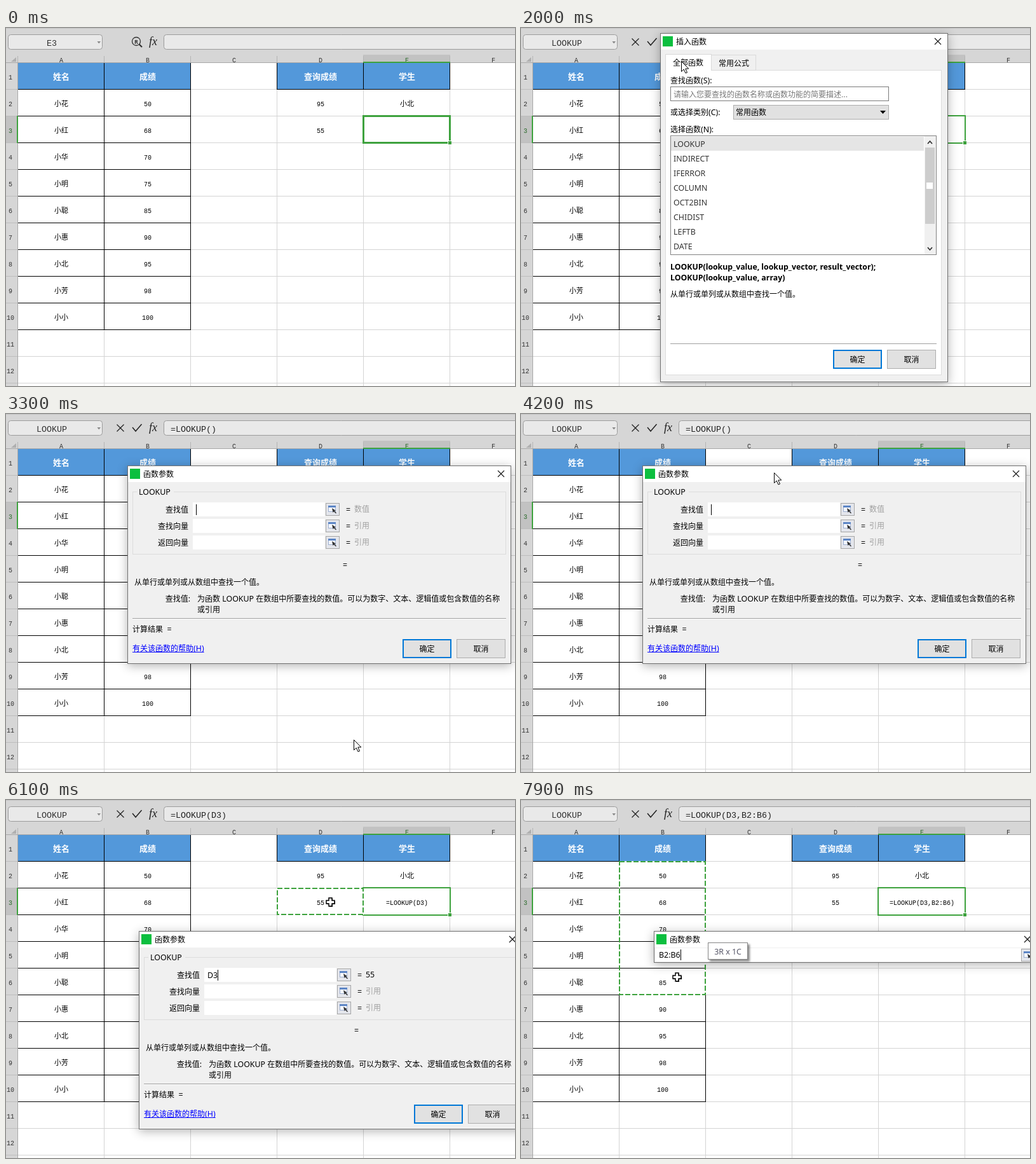
An HTML page with a canvas that plays this animation: 801x563 px, repeating every 8000 ms.

```html
<!DOCTYPE html>
<html lang="zh-CN">
<head>
<meta charset="utf-8">
<title>LOOKUP</title>
<style>
html, body { margin: 0; width: 100%; height: 100%; overflow: hidden; background: #fff; }
canvas { display: block; }
</style>
</head>
<body>
<canvas id="stage" width="801" height="563"></canvas>
<script>
const g = document.getElementById('stage').getContext('2d');
const W = 801, H = 563, LOOP = 8000, STEP = 100;
const GREEN = '#3ea23e', BLUE = '#5398da', GRAY = '#d6d6d6', FACE = '#f0f0f0', ACCENT = '#0078d7';
const CJK = '"Noto Sans CJK SC", "Noto Sans CJK", sans-serif';
const MONO = '"Liberation Mono", monospace', SANS = '"Noto Sans", "Open Sans", sans-serif';

// Each style sets Latin and Chinese runs separately.
const UI = { lat: `12.4px ${SANS}`, cjk: `12px ${CJK}`, drop: 4.5 };
const BOLD = { lat: `bold 12.3px ${SANS}`, cjk: `bold 12px ${CJK}`, drop: 4.5 };
const CELL = { lat: `10px ${MONO}`, cjk: `11px ${CJK}`, drop: 4 };
const BAR = { lat: `13.33px ${MONO}`, cjk: `13px ${CJK}`, drop: 5 };
const HEAD = { lat: `bold 13px ${SANS}`, cjk: `bold 13px ${CJK}`, drop: 5 };

function text(s, x, y, style = UI, color = '#000', align = 0) {
  const runs = s.match(/[\x20-\x7e]+|[^\x20-\x7e]+/g) || [];
  const parts = runs.map(run => {
    const font = run.charCodeAt(0) < 127 ? style.lat : style.cjk;
    g.font = font;
    return { run, font, w: g.measureText(run).width };
  });
  const width = parts.reduce((sum, p) => sum + p.w, 0);
  let px = x - width * align;
  g.fillStyle = color;
  for (const p of parts) {
    g.font = p.font;
    g.fillText(p.run, px, y + style.drop);
    px += p.w;
  }
  return px;
}

function box(x, y, w, h, fill, stroke, line = 1) {
  if (fill) { g.fillStyle = fill; g.fillRect(x, y, w, h); }
  if (stroke) {
    g.strokeStyle = stroke; g.lineWidth = line;
    g.strokeRect(x + line / 2, y + line / 2, w - line, h - line);
  }
}

function pill(x, y, w, h, fill, stroke) {
  g.beginPath();
  g.roundRect(x + .5, y + .5, w, h, 4);
  g.fillStyle = fill; g.fill();
  if (stroke) { g.strokeStyle = stroke; g.lineWidth = 1; g.stroke(); }
}

function path(points, stroke, line = 1, fill) {
  g.beginPath();
  points.forEach(([x, y], i) => i ? g.lineTo(x, y) : g.moveTo(x, y));
  if (fill) { g.closePath(); g.fillStyle = fill; g.fill(); }
  if (stroke) { g.strokeStyle = stroke; g.lineWidth = line; g.stroke(); }
}

function cross(x, y, r) {
  path([[x - r, y - r], [x + r, y + r]], '#222', 1.3);
  path([[x + r, y - r], [x - r, y + r]], '#222', 1.3);
}

function withShadow(blur, dx, dy, alpha, draw) {
  g.save();
  g.shadowColor = `rgba(0,0,0,${alpha})`;
  g.shadowBlur = blur;
  g.shadowOffsetX = dx;
  g.shadowOffsetY = dy;
  draw();
  g.restore();
}

// ---- sheet ----
const colX = i => 18 + 136 * i, rowY = i => 54 + 42 * i;
const names = ['小花', '小红', '小华', '小明', '小聪', '小惠', '小北', '小芳', '小小'];
const scores = [50, 68, 70, 75, 85, 90, 95, 98, 100];

function cell(s, col, row) {
  text(String(s), colX(col) + 69, rowY(row) + 23, CELL, '#000', .5);
}

function titleCell(s, col) {
  box(colX(col), 54, 137, 43, BLUE, '#000');
  text(s, colX(col) + 69, 75.5, HEAD, '#fff', .5);
}

function drawCells() {
  box(0, 0, W, H, '#fff');
  for (let i = 1; i < 6; i++) box(colX(i), 54, 1, H, '#d4d4d4');
  for (let i = 1; i <= 12; i++) box(18, rowY(i), W, 1, '#d4d4d4');
  for (let c = 0; c < 2; c++)
    for (let r = 1; r < 10; r++) box(colX(c), rowY(r), 137, 43, null, '#000');
  titleCell('姓名', 0);
  titleCell('成绩', 1);
  titleCell('查询成绩', 3);
  titleCell('学生', 4);
  names.forEach((n, i) => { cell(n, 0, i + 1); cell(scores[i], 1, i + 1); });
  cell(95, 3, 1);
  cell('小北', 4, 1);
  cell(55, 3, 2);
}

// Headers go over the cells, hiding the table's outer left and top borders.
function drawHeaders() {
  box(0, 0, W, 54, GRAY);
  box(0, 54, 18, H, GRAY);
  box(0, 0, W, 1, '#c4c4c4');
  box(562, 42, 137, 12, '#c2c2c2');
  box(0, 139, 18, 42, '#c2c2c2');
  for (let i = 0; i < 6; i++) {
    box(colX(i), 44, 1, 10, '#b4b4b4');
    text('ABCDEF'[i], colX(i) + 69, 49.5, CELL, i === 4 ? '#2b6b2b' : '#333', .5);
  }
  for (let i = 0; i < 12; i++) {
    box(0, rowY(i + 1), 18, 1, '#bdbdbd');
    text(String(i + 1), 7, rowY(i) + 23, CELL, i === 2 ? '#2b6b2b' : '#333', .5);
  }
  box(0, 54, W, 1, '#a8a8a8');
  box(18, 54, 1, H, '#a8a8a8');
  box(562, 53, 137, 2, GREEN);
  box(17, 138, 2, 43, GREEN);
  path([[16, 46], [16, 53], [8, 53]], null, 1, '#b0b0b0');
}

function drawSelection(s) {
  if (s.cellText) cell(s.cellText, 4, 2);
  box(561, 137, 139, 45, null, GREEN, s.edit ? 2 : 3);
  box(695, 177, 6, 6, '#fff');
  box(696, 178, 5, 5, GREEN);
  if (s.ants) drawAnts(...s.ants);
}

function drawAnts(col, row, rows) {
  const x = colX(col), y = rowY(row), h = 42 * rows;
  g.strokeStyle = '#fff'; g.lineWidth = 2;
  g.strokeRect(x + 1, y + 1, 135, h - 1);
  g.setLineDash([8, 3]);
  g.strokeStyle = GREEN;
  g.strokeRect(x + 1, y + 1, 135, h - 1);
  g.setLineDash([]);
}

function drawBar(s) {
  pill(3, 10, 148, 23, '#e9e9e9', '#9c9c9c');
  text(s.edit ? 'LOOKUP' : 'E3', 72, 22.5, BAR, '#333', .5);
  path([[143.5, 21], [149, 21], [146.2, 24.5]], null, 1, '#888');
  if (s.hot) pill(s.hot, 10, 23, 23, '#a2a2a2');
  if (s.edit) {
    cross(180, 22, 5.5);
    path([[199, 21], [204, 27], [213.5, 16]], '#222', 1.5);
  } else {
    g.beginPath();
    g.arc(205, 21, 6.5, 0, 7);
    g.strokeStyle = '#333'; g.lineWidth = 1.3; g.stroke();
    path([[209.5, 25.5], [214, 30]], '#333', 2.2);
    g.font = `bold 9px ${SANS}`; g.fillStyle = '#333';
    g.fillText('R', 202, 24.5);
  }
  g.font = 'italic 18px "Liberation Serif", serif';
  g.fillStyle = '#222';
  g.fillText('fx', 225, 27);
  pill(248, 10, 570, 23, '#e9e9e9', '#9c9c9c');
  if (s.formula) text(s.formula, 259, 22.5, BAR, '#222');
}

// ---- dialogs ----
// The border lies just outside the given box.
function frame(x, y, w, h, title) {
  withShadow(15, 0, 3, .3, () => box(x - 1, y - 1, w + 1, h + 1, FACE));
  box(x, y, w, 25, '#fff');
  box(x - 1, y - 1, w + 1, h + 1, null, '#707070');
  box(x + 3, y + 4, 16, 16, '#0cbf3f');
  text(title, x + 24, y + 12);
  cross(x + w - 16, y + 12, 5);
}

function button(s, x, y, focus, hover) {
  box(x, y, 77, 30, hover ? '#e5f1fb' : '#e1e1e1', focus ? ACCENT : '#adadad', focus && !hover ? 2 : 1);
  text(s, x + 38.5, y + 15, UI, '#000', .5);
}

const functions = ['LOOKUP', 'INDIRECT', 'IFERROR', 'COLUMN', 'OCT2BIN', 'CHIDIST', 'LEFTB', 'DATE'];
const SUMMARY = '从单行或单列或从数组中查找一个值。';

function drawInsert(hover) {
  frame(220, 9, 452, 548, '插入函数');
  box(227, 66, 435, 480, '#fff', '#dcdcdc');
  box(299, 42, 71, 25, FACE, '#d9d9d9');
  box(227, 41, 73, 26, '#fff', '#d9d9d9');
  box(228, 65, 71, 3, '#fff');
  text('全部函数', 239, 54);
  text('常用公式', 311, 55);
  text('查找函数(S):', 235, 82);
  box(235, 92, 344, 23, '#fff', '#7a7a7a');
  text('请输入您要查找的函数名称或函数功能的简要描述...', 240, 104, UI, '#777');
  text('或选择类别(C):', 235, 132);
  box(334, 121, 245, 23, '#e1e1e1', '#adadad');
  text('常用函数', 338, 132);
  path([[565, 130], [574, 130], [569.5, 135]], null, 1, '#000');
  text('选择函数(N):', 235, 159);
  box(235, 169, 419, 188, '#fff', '#828282');
  box(236, 171, 398, 22, '#e5e5e5');
  functions.forEach((f, i) => text(f, 240, 182 + 23 * i, UI, '#333'));
  box(635, 170, 18, 186, FACE);
  box(636, 188, 15, 120, '#cdcdcd');
  box(638, 243, 10, 10, '#fff');
  path([[640, 182], [643.5, 178], [647, 182]], '#333', 1.8);
  path([[640, 345], [643.5, 349], [647, 345]], '#333', 1.8);
  text('LOOKUP(lookup_value, lookup_vector, result_vector);', 235, 375, BOLD);
  text('LOOKUP(lookup_value, array)', 235, 392, BOLD);
  text(SUMMARY, 235, 418);
  box(235, 496, 419, 1, '#a0a0a0');
  button('确定', 491, 506, true, hover);
  button('取消', 576, 506);
}

function picker(x, y) {
  box(x, y, 22, 20, '#e4e6ec', '#a6a6a6');
  box(x + 4, y + 4, 12, 10, '#f4f7fd', '#9fb0d0');
  box(x + 4, y + 4, 12, 3, '#5d86c6');
  path([[x + 10, y + 8], [x + 16, y + 12], [x + 14, y + 12.5], [x + 17, y + 15.5],
    [x + 16, y + 16.5], [x + 13, y + 13.5], [x + 11.5, y + 15]], null, 1, '#333');
}

function caret(x, y) { box(Math.round(x), y - 8, 1, 17, '#000'); }

const args = ['查找值', '查找向量', '返回向量'];
const help = [
  ['为函数 LOOKUP 在数组中所要查找的数值。可以为数字、文本、逻辑值或包含数值的名称', '或引用'],
  ['只包含单行或单列的单元格区域，其值为文本、数值或者逻辑值且以升序排序', '']
];

function drawArgs(s) {
  const [x, y] = s.args;
  frame(x, y, 603, 311, '函数参数');
  box(x + 7, y + 40, 588, 99, null, '#dcdcdc');
  box(x + 14, y + 34, 58, 12, FACE);
  text('LOOKUP', x + 17, y + 40);
  args.forEach((label, i) => {
    const ry = y + 68 + 26 * i;
    text(label, x + 95, ry, UI, '#000', 1);
    box(x + 102, ry - 11, 208, 22, '#fff');
    picker(x + 311, ry - 10);
    text('=', x + 343, ry);
    const known = i === 0 && s.value;
    text(known ? '55' : i ? '引用' : '数值', x + 356, ry - 1, UI, known ? '#000' : '#a0a0a0');
    const end = known ? text(s.value, x + 107, ry) : x + 107;
    if (s.caret && s.field === i) caret(end, ry);
  });
  text('=', x + 338, y + 155);
  text(SUMMARY, x + 10, y + 182);
  text(args[s.field] + ':', x + 98, y + 208, UI, '#000', 1);
  help[s.field].forEach((line, i) => text(line, x + 109, y + 208 + 17 * i));
  box(x + 7, y + 239, 588, 1, '#a0a0a0');
  box(x + 7, y + 240, 588, 1, '#fff');
  text('计算结果  =', x + 7, y + 256);
  const end = text('有关该函数的帮助(H)', x + 7, y + 286, UI, '#00f');
  box(x + 7, y + 292, end - x - 7, 1, '#00f');
  button('确定', x + 432, y + 272, true);
  button('取消', x + 517, y + 272);
}

function drawPick(s) {
  frame(210, 207, 603, 49, '函数参数');
  box(211, 233, 576, 21, '#fff');
  caret(text(s.pick, 217, 243), 243);
  picker(787, 234);
  if (s.tip) {
    withShadow(3, 3, 3, .45, () => box(294, 224, 63, 27, '#fff'));
    box(294, 224, 63, 27, null, '#858585');
    text(s.tip, 325.5, 238, UI, '#575768', .5);
  }
}

// ---- pointer ----
const route = [
  [400, 722, 121], [500, 651, 153], [800, 651, 153], [1400, 214, 27], [1500, 208, 22],
  [1700, 231, 20], [1900, 231, 20], [2400, 430, 330], [2500, 430, 330], [3100, 548, 518],
  [3200, 548, 518], [3400, 546, 506], [4200, 398, 92], [4300, 416, 215], [4400, 416, 217],
  [5000, 391, 282], [5100, 391, 282], [5700, 510, 160], [6300, 510, 160], [6700, 400, 303],
  [6900, 400, 303], [7200, 236, 168], [7400, 222, 119], [7600, 222, 119], [7700, 230, 160],
  [7800, 238, 203], [7900, 245, 278]
];

function pointerAt(t) {
  const i = route.findIndex(k => k[0] >= t);
  if (i < 1) return route[0].slice(1);
  const [t0, x0, y0] = route[i - 1], [t1, x1, y1] = route[i];
  const p = (t - t0) / (t1 - t0), e = p * p * (3 - 2 * p);
  return [x0 + (x1 - x0) * e, y0 + (y1 - y0) * e].map(Math.round);
}

function pointerKind(t, x, y) {
  if (t >= 1900 && t < 4400) return 'arrow';
  if (t >= 4400 && x >= 210 && y >= 207 && t < 7500) {
    const row = y - 207 - 57;
    return x >= 312 && x < 520 && row >= 0 && row < 78 && row % 26 < 22 ? 'beam' : 'arrow';
  }
  return y < 43 ? 'arrow' : 'plus';
}

function drawPointer(t) {
  if (t < 400) return;
  const [x, y] = pointerAt(t), kind = pointerKind(t, x, y);
  g.save();
  g.translate(x + .5, y + .5);
  if (kind === 'arrow') {
    path([[0, 0], [0, 16], [3.7, 12.5], [6.5, 18.5], [9, 17.5], [6.3, 11.5], [11.3, 11.5], [0, 0]], '#000', 1, '#fff');
  } else if (kind === 'beam') {
    path([[-4, -8], [-1, -8], [0, -7], [1, -8], [4, -8]], '#000', 1.3);
    path([[-4, 8], [-1, 8], [0, 7], [1, 8], [4, 8]], '#000', 1.3);
    path([[0, -7], [0, 7]], '#000', 1.3);
  } else {
    const a = 2.5, b = 6.5;
    const plus = [[-a, -b], [a, -b], [a, -a], [b, -a], [b, a], [a, a], [a, b], [-a, b], [-a, a], [-b, a], [-b, -a], [-a, -a], [-a, -b]];
    path(plus.map(([px, py]) => [px + 1, py + 1]), null, 1, '#000');
    path(plus, '#000', 1.5, '#fff');
  }
  g.restore();
}

// ---- timeline ----
function stateAt(t) {
  const s = { edit: t >= 1900, hot: 0, field: t >= 6800 ? 1 : 0 };
  if (t >= 1400 && t < 1600) s.hot = 194;
  else if (t >= 1600 && t < 1900) s.hot = 220;

  const last = t < 7700 ? 2 : t < 7800 ? 3 : t < 7900 ? 4 : 6;
  const range = last === 2 ? 'B2' : 'B2:B' + last;
  if (t >= 7600) s.formula = `=LOOKUP(D3,${range})`;
  else if (t >= 6000) s.formula = '=LOOKUP(D3)';
  else if (t >= 3300) s.formula = '=LOOKUP()';
  else if (t >= 1900) s.formula = '=';
  s.cellText = t >= 4300 && t < 4400 ? '' : s.formula;

  s.insert = t >= 1900 && t < 3300;
  s.hover = t >= 3000;
  if (t >= 7600) {
    s.pick = range;
    s.ants = [1, 1, last - 1];
    if (t >= 7800) s.tip = t < 7900 ? '2R x 1C' : '3R x 1C';
  } else if (t >= 6000 && t < 6100) {
    s.pick = 'D3';
  } else if (t >= 3300) {
    s.args = t < 4300 ? [192, 82] : t < 4400 ? [209, 205] : [210, 207];
  }
  if (t >= 6000 && t < 6800) s.ants = [3, 2, 1];
  if (t >= 6100) s.value = 'D3';
  s.caret = t < 4400 || t >= 5300;
  return s;
}

function draw(now) {
  const t = Math.floor((now % LOOP) / STEP) * STEP;
  const s = stateAt(t);
  drawCells();
  drawHeaders();
  drawSelection(s);
  drawBar(s);
  if (s.insert) drawInsert(s.hover);
  if (s.args) drawArgs(s);
  if (s.pick) drawPick(s);
  drawPointer(t);
}

const start = performance.now();
function tick() {
  draw(performance.now() - start);
  requestAnimationFrame(tick);
}
tick();
</script>
</body>
</html>
```
